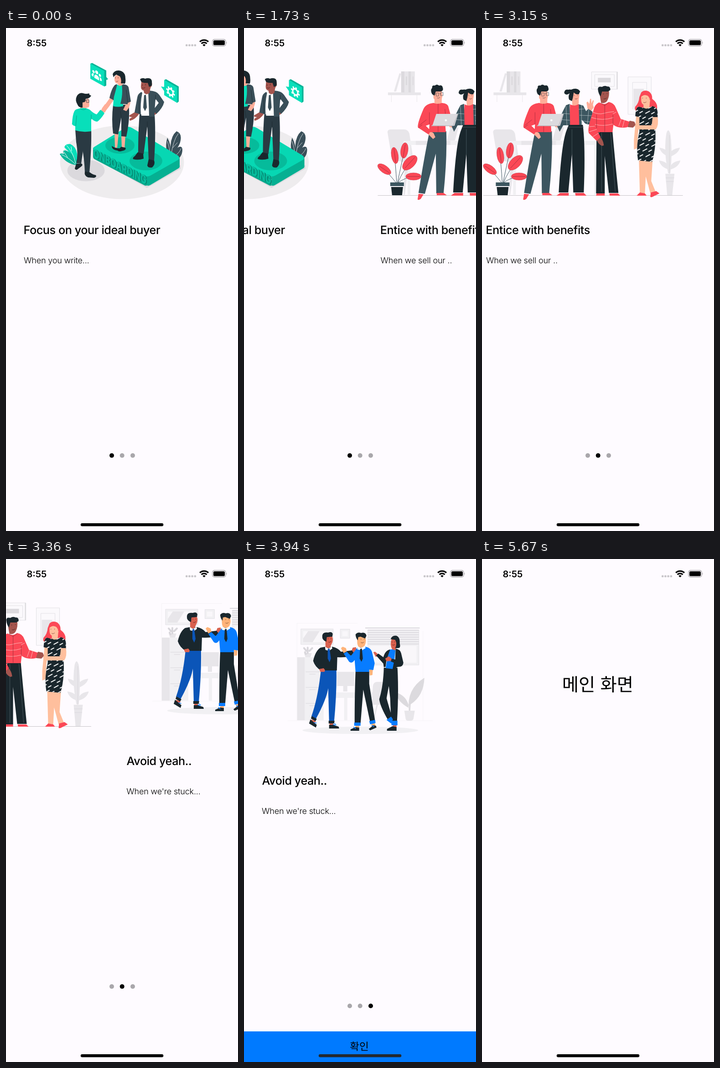
Animation of 509 by 1101 pixels, one loop 6000 ms. Source, as an HTML page:

```html
<!DOCTYPE html>
<html lang="ko">
<head>
<meta charset="utf-8">
<title>Onboarding</title>
<style>
html,body{margin:0;width:100%;height:100%;overflow:hidden;background:#fefbff}
svg{display:block;width:100%;height:100%;font-family:Inter,"Noto Sans CJK KR","Noto Sans CJK",sans-serif;text-rendering:geometricPrecision}
.h{font-size:25.2px;font-weight:500;letter-spacing:-.43px}
.b{font-size:18px;font-weight:300;letter-spacing:-.17px}
.ko{font-family:"Noto Sans CJK KR","Noto Sans CJK",sans-serif;text-anchor:middle}
.ln{fill:none;stroke-linecap:round;stroke-linejoin:round}
.t{fill:#08dfba}.td{fill:#06b598}.n{fill:#3a4f59}.d{fill:#2a3a43}.k{fill:#1a272d}
.s{fill:#ffad98}.br{fill:#a4554e}.w{fill:#fff}
.r{fill:#fb4856}.p{fill:#3c5660}.peach{fill:#ffbf9d}.dash{fill:url(#dash)}
.g1{fill:#f1f0f3}.g2{fill:#e8e6ea}.g3{fill:#dcdade}
.u{fill:#087cff}.ud{fill:#0b55b8}.o{fill:#ffb37a}.m{fill:#d9614f}
</style>
</head>
<body>
<svg viewBox="0 0 509 1101" preserveAspectRatio="none">
<defs>
<pattern id="dash" width="22" height="14" patternUnits="userSpaceOnUse" patternTransform="rotate(-28)">
<path d="M2 3h10M13 10h7" stroke="#fff" stroke-width="1.8" stroke-linecap="round"/>
</pattern>
</defs>
<g id="pages">

<g>
<ellipse cx="254.500" cy="294" rx="136" ry="80.500" fill="#eeecee"/>
<ellipse cx="175.500" cy="312" rx="41" ry="23.500" fill="#dbd9dd"/>
<path class="g3" d="M191 284L309 350 383 308V300L309 335Z"/>
<g class="n">
<path d="M358 288Q347 262 354 240Q361 252 361 266Q360 238 374 226Q386 230 383 246Q382 254 376 262Q386 256 387 266Q387 282 373 290Z"/>
<path class="ln" stroke="#dfe5e8" stroke-width=".9" d="M362 284Q365 248 378 231M354 248Q359 262 361 282M367 282Q379 276 384 264M366 262l10-11"/>
</g>
<g class="t">
<path d="M152 300Q145 276 128 261Q130 253 141 254Q153 259 156 275V300Z"/>
<path class="td" d="M153 300Q130 296 118 276Q120 273 128 276Q122 267 131 268Q146 273 154 290Z"/>
<path class="ln" stroke="#fff" stroke-width="1" d="M133 257Q147 272 153 296M122 277Q138 284 152 298M144 269l-1-9M135 283l-8-12"/>
</g>
<path fill="#05b092" d="M309 322L381 284V303Q381 306 377 308L316 344Q309 347 309 343Z"/>
<path fill="#06a88c" d="M191 262L309 322V345H305L194 287Q191 285 191 282Z"/>
<path fill="#07d7b3" d="M194 260L262 218Q269 214 277 219L377 279Q383 284 377 289L317 323Q309 327 302 323L194 268Q188 264 194 260Z"/>
<g fill="#06bb9b"><ellipse cx="250" cy="257" rx="32" ry="18"/><ellipse cx="307" cy="291" rx="36" ry="20.500"/></g>
<g font-size="26" font-weight="800">
<text transform="matrix(.65 .34 0 1 193.500 283)" fill="#058671">ONBOARDING</text>
<text transform="matrix(.65 .34 0 1 191.500 282)" fill="#07bf9f">ONBOARDING</text>
</g>
<!-- speech bubbles -->
<path class="td" d="M185 78L189 76.500 220 93V126L216 128ZM375 130L379 128V161L375 164Z"/>
<path class="td" d="M215 101L224 112 215 116ZM347 114L351 112 379 128 375 131Z"/>
<path class="t" d="M185 78L215.500 94V128L185 111ZM347 114L375.500 130V164L347 147V138L340 128 347 129Z"/>
<g class="w" transform="matrix(.87 .5 0 1 199 103)">
<circle cy="-6" r="3.800"/><circle cx="-8" cy="-3.500" r="3"/><circle cx="8" cy="-3.500" r="3"/>
<path d="M-6 9Q-7 0 0 0Q7 0 6 9ZM-13 7Q-13 0-7 1Q-9 4-8 8ZM13 7Q13 0 7 1Q9 4 8 8Z"/>
</g>
<g class="ln" stroke="#fff" transform="matrix(.87 .45 0 1 361 140)">
<circle r="6.500" stroke-width="3.600"/><circle r="9.500" stroke-width="3.200" stroke-linecap="butt" stroke-dasharray="3.730"/>
</g>
<!-- woman -->
<path class="s" d="M238 229l9 2-3 31-5 0ZM253 235l9 1-2 28-6-2Z"/>
<path class="k" d="M232 258q8 6 16 5q3 6-5 5q-11-2-11-10ZM253 260l9 2q2 4-3 6l-8 2q-7 0-6-3Z"/>
<path class="d" d="M235 168H269Q273 195 264 238L253 237 253 196 246 233 235 231Q231 200 235 168Z"/>
<path class="t" d="M238 125L256 123 257 171Q246 174 235 171Z"/>
<path class="s" d="M228 153L236 158 226 172 219 181 213 174ZM266 161l7-1q0 12-9 22l-7-3Z"/>
<path class="n" d="M240 124L244 123Q240 140 237 150L236 158 227 153Q232 130 240 124ZM254 123Q267 123 269 130L274 161 267 164V167L251 166Q257 145 254 123Z"/>
<path class="ln" stroke="#1d2b32" stroke-width=".8" d="M264 136l3 27M253 196l-2-14"/>
<path class="s" d="M240 104L254 100 256 124Q251 129 246 125V122Q237 121 238 110Z"/>
<path class="k" d="M234 101Q238 92 248 93Q262 95 262 110Q263 118 261 122L252 121Q254 112 250 106L242 102Q238 104 236 108Z"/>
<path class="ln" stroke="#6c2f2c" stroke-width=".8" d="M240 108v2m6-2v2m-4 7q3 1 4-1"/>
<!-- man in a suit -->
<path class="d" d="M293 189H326Q329 230 325 290H313L310 215 302 276 290 273Q290 225 293 189Z"/>
<path class="k" d="M289 272L301 275 302 286Q290 290 279 287Q277 284 283 280ZM313 287L325 290Q328 298 321 305Q312 307 310 301Z"/>
<path class="w" d="M297 143L314 139 316 192H297Z"/>
<path class="n" d="M303 147l4-1 2 28-4 8-4-8Z"/>
<path class="br" d="M283 184l9 4Q284 200 272 203Q268 199 277 195Q268 195 271 191ZM323 180l8 7q-7 6-14 5l1-6Z"/>
<path class="n" d="M297 140Q289 144 288 152L282 185 292 188 296 192Q294 165 299 142ZM315 137Q331 138 336 146L347 162Q344 175 330 188L322 181 335 164 328 155 326 181V194H314Q313 160 312 140Z"/>
<path class="ln" stroke="#1d2b32" stroke-width=".9" d="M292 150v37M328 147v10M310 205v12"/>
<path class="br" d="M297 117L319 116Q323 124 317 131L315 142Q308 148 303 142L302 137Q296 136 296 128Z"/>
<path class="k" d="M294 112Q300 108 305 111Q318 107 320 116L320 126 314 129 311 120Q303 121 297 118Z"/>
<path class="ln" stroke="#461e1e" stroke-width=".9" d="M299 124v2m7-3v2m-7 6q4 2 6-1"/>
<!-- man in a sweater -->
<path class="d" d="M152 223H170V262Q168 275 165 297L154 296Q159 275 154 250Z"/>
<path class="d" d="M160 223H187Q188 260 183 317L173 316Q172 285 165 250Z"/>
<path class="k" d="M154 297L166 297Q170 300 164 304L156 310Q149 311 152 304ZM173 314L184 316Q190 321 197 322Q200 326 193 328L180 327Q171 324 173 314Z"/>
<path class="s" d="M207 184L211 175 217 167 222 166 224 172 217 185ZM164 160L181 154Q184 168 182 173L176 175 175 180Q168 182 163 177Z"/>
<path class="t" d="M158 177Q172 172 184 179Q192 187 199 189L207 179Q213 182 216 187Q206 202 200 205Q194 205 187 198V226Q168 229 152 224V215Q143 212 145 208Q146 190 150 182Q152 178 158 177Z"/>
<path class="ln" stroke="#069f86" stroke-width="1" d="M155 192l-2 22M187 190v10M163 177q7 4 13 0"/>
<path class="k" d="M168 174Q160 175 157 168Q151 158 155 150Q160 140 170 143Q175 145 183 143Q181 146 187 148Q183 155 175 155L173 162 168 163Z"/>
<path class="ln" stroke="#263238" stroke-width=".8" d="M171 160l5-1m0-2h6v6h-5Z"/>
<text class="h" x="38.400" y="451">Focus on your ideal buyer</text>
<text class="b" x="39" y="514.500">When you write...</text>
</g>

<g transform="translate(497.300)">
<!-- room -->
<path class="g2" d="M67 141h72v6H67ZM74 147h1v15h-1ZM130 147h1v15h-1ZM80 139L92 99l4 1-11 39ZM96 95h30v46H96Z"/>
<path class="g3" d="M96 95h7v46h-7ZM112 95h5v46h-5ZM106 106h3v19h-3ZM121 106h2v19h-2Z"/>
<path fill="#fbf9fc" stroke="#e2e0e5" d="M282 96h57v38h-57ZM289 102h43v26h-43ZM362 107h51v82h-51ZM372 119h31v58h-31Z"/>
<path class="g3" d="M296 109h28v10h-28ZM337 96h2v38h-2Z"/>
<path class="g2" d="M374 133h23v42h-23Z"/>
<path class="g2" d="M66 228Q66 222 73 222H102Q111 222 114 231L122 284 113 294 104 365H101L104 294 76 288Z"/>
<path class="g1" d="M101 247h190v9H101ZM110 256h6v109h-6ZM288 250h4v115h-4ZM194 250l22-33h5l-10 39Z"/>
<path class="g2" d="M128 247h76v9h-76ZM204 218h18l-8 28h-18ZM444 319h20l-5 47h-11Z"/>
<g class="g2">
<path d="M450 318Q440 270 446 232Q450 216 455 232Q460 270 455 318Z"/>
<path d="M452 282Q434 275 431 262Q447 264 452 276ZM453 282Q472 276 476 262Q458 264 453 276ZM452 310Q434 305 430 290Q448 292 452 305ZM454 310Q473 305 477 290Q459 292 454 305Z"/>
</g>
<path class="ln" stroke="#c7c5c9" stroke-width="1" d="M45 366.500H482"/>
<path class="ln" stroke="#d6d4d8" stroke-width=".8" d="M453 235v84M445 328h18M446 336h16"/>
<!-- potted plant -->
<path class="ln" stroke="#3c5660" stroke-width="1" d="M84 338Q70 319 54 306M86 338Q84 300 80 270M88 338Q96 300 103 268M89 338Q100 312 118 291M90 338Q103 328 126 324"/>
<g class="r" stroke="#b73040" stroke-width=".5">
<ellipse cx="59" cy="309" rx="17" ry="8" transform="rotate(36 59 309)"/>
<ellipse cx="82" cy="279" rx="7.500" ry="18" transform="rotate(-9 82 279)"/>
<ellipse cx="103" cy="268" rx="8" ry="17" transform="rotate(8 103 268)"/>
<ellipse cx="115" cy="295" rx="20" ry="11" transform="rotate(-45 115 295)"/>
<ellipse cx="123" cy="325" rx="17" ry="8"/>
</g>
<path class="ln" stroke="#6e2833" stroke-width=".6" d="M48 302L70 317M80 264L84 294M105 255L100 284M126 283L104 307M109 325H137"/>
<path class="p" d="M72 338h30v8H72Z"/><path class="k" d="M74 348h26l-2 18H76Z"/>
<!-- man with a laptop -->
<path class="p" d="M158 227L195 226Q197 285 189 362H173L172 275 148 363 134 361Q146 285 158 227Z"/>
<path class="r" d="M134 363l11 1-6 10q-6 4-7 1ZM174 361h15l7 5h-22Z"/>
<path class="s" d="M169 150L185 147V163L182 168H169ZM157 224l10 6 4 9-5 4-12-12Z"/>
<path class="r" d="M167 164Q176 168 185 164Q199 165 200 174L207 200 193 215 194 228H157L158 211 150 214 161 225 156 233 133 218Q130 212 145 177Q150 166 167 164Z"/>
<path class="ln" stroke="#a52a3b" stroke-width=".8" d="M158 185v25M136 213l15-12M177 166v62M192 178l2 20M134 218l8-6"/>
<path class="s" d="M166 136H184Q188 147 185 155Q183 162 174 161L167 154Z"/>
<path class="k" d="M164 145Q159 136 164 131Q163 125 170 126Q174 122 179 126Q186 124 187 130Q190 137 183 139H172L169 148Z"/>
<path class="ln" stroke="#364248" stroke-width=".7" d="M169 145h4m0-3h5v7h-5Zm7 2h3m0-3h5v7h-5ZM175 153q3 2 6-1"/>
<!-- woman with a bun -->
<path class="s" d="M239 152L254 148V164L251 171H240ZM273 176L271 163l3-2 3 5 2-11 2 0 1 10 3-7 2 1-2 9 2 6-7 9ZM214 206l-13 4 1 7 13 2Z"/>
<path class="r" d="M235 167Q245 173 254 166L259 213H232Z"/>
<path class="p" d="M234 166L235 213H220L212 227 205 211Q222 176 226 169ZM254 167L264 170 270 182 275 177 284 183V208Q279 214 268 209L261 201V213H255Z"/>
<path class="ln" stroke="#d7e2e4" stroke-width=".6" d="M226 171l2 42M217 187l17 1M210 200l24 2M260 169v43M254 178l12-1M256 191l28 1M259 203l24 3M276 178l-3 32"/>
<path class="k" d="M232 212H263Q269 260 265 360H242L239 275 231 360H210Q216 250 228 222Z"/>
<path class="ln" stroke="#64747b" stroke-width=".6" d="M229 217h36M239 222v54"/>
<path class="r" d="M213 361h19v6h-27ZM246 361h19l6 6h-24Z"/>
<path class="s" d="M238 141L254 139Q257 148 253 158Q249 163 242 160L237 153Z"/>
<path class="k" d="M234 143Q226 149 222 142Q223 133 231 135Q235 134 237 135Q251 129 257 139L254 145Q247 146 243 141L241 153 239 160 233 157Q230 150 234 143Z"/>
<path class="ln" stroke="#713c36" stroke-width=".8" d="M244 147v1m7-1v1m-5 7q3 2 5-1"/>
<!-- laptop -->
<path class="g3" d="M173 188h48l-8 26h-50l2-2Z"/><path class="ln" stroke="#bdbbc0" stroke-width="1.500" d="M163 214h47l10-25"/>
<circle class="w" cx="194" cy="202" r="2.300"/>
<!-- man in a striped shirt -->
<path class="k" d="M293 227H328Q334 295 341 361H320L311 280V362H292Z"/>
<path class="ln" stroke="#64747b" stroke-width=".6" d="M304 230v128M324 230l10 128"/>
<path class="r" d="M293 362h18v5h-19ZM321 362h19l5 5h-23Z"/>
<path class="br" d="M293 244l8-5q7 7 8 18l-4 1q-8-3-12-14ZM359 211l7-8 10 2 3 7-6 6-11-1Z"/>
<path class="r" d="M299 163Q309 170 320 162Q331 164 335 174L346 199 365 205 361 217Q342 221 330 212L328 228H292L291 218 302 239 293 247 276 230Q272 220 286 181Q289 166 299 163Z"/>
<path class="ln" stroke="#ffc2c0" stroke-width=".9" d="M284 184q14 6 24 3t23-4M282 196q24 8 48 0M290 211q18 5 39-1M336 184l-7 4M347 200l-5 14M354 202l-4 15M277 216l12-1M277 227l16-5M285 238l14-9"/>
<path class="ln" stroke="#932d38" stroke-width=".8" d="M311 168v59M293 190v29M329 190v20M302 164l9 6 9-7"/>
<path class="br" d="M299 136H320Q322 148 317 158Q313 166 303 164L301 153Z"/>
<path class="k" d="M296 134Q296 127 305 129Q311 125 316 128Q324 127 323 136L318 139H305L302 150Q297 144 296 134Z"/>
<path class="ln" stroke="#3f2522" stroke-width=".9" d="M308 144v1m8-2v1m-7 11q4 1 6-2"/>
<!-- woman in a dress -->
<path class="r" d="M391 141Q398 134 408 139Q416 145 415 155Q427 164 426 174Q426 184 411 184L386 184Q374 181 378 172Q386 164 387 151Z"/>
<path class="peach" d="M386 289H416L413 335 424 362H411L401 325 399 363H388Z"/>
<path class="peach" d="M380 192L390 190 384 230 382 263 375 266 375 245Z"/>
<g id="dress">
<path class="k" d="M385 172Q402 178 416 171Q427 174 427 184V197L416 195 416 219 422 224Q424 263 415 293L384 290Q379 259 387 227V195L378 193Q379 174 385 172Z"/>
<path class="dash" d="M385 172Q402 178 416 171Q427 174 427 184V197L416 195 416 219 422 224Q424 263 415 293L384 290Q379 259 387 227V195L378 193Q379 174 385 172Z"/>
</g>
<path class="peach" d="M391 147L408 143Q413 152 410 162L409 174Q402 179 396 174V168Q390 165 391 154ZM416 195L427 195Q430 213 423 222L378 222 377 213 414 213Z"/>
<path class="r" d="M389 148Q391 139 402 139Q412 142 415 154L410 158Q409 148 401 147Q396 146 389 152ZM388 360l11 2 4 5h-22ZM412 360l12-3 7 5-16 8q-5 1-4-2Z"/>
<path class="ln" stroke="#773a32" stroke-width=".8" d="M394 153v1m8-1v1m-6 9q3 2 6-1"/>
<text class="h" x="50" y="451">Entice with benefits</text>
<text class="b" x="50.700" y="514.500">When we sell our ..</text>
</g>

<g transform="translate(1008.700)">
<!-- office -->
<path fill="none" stroke="#f5f3f6" d="M125.500 310V97.500H258M402 115V310M105 311H423"/>
<path class="g1" stroke="#e4e2e7" d="M134 110h71v34h-71ZM220.500 110.500h21v20h-21ZM281 112h112v77H281Z"/>
<path fill="#f9f7fa" d="M139 115h61v24h-61ZM225 115h12v11h-12ZM286 147h48v37h-48ZM340 147h48v37h-48Z"/>
<path class="g2" d="M150 115h25l-15 24h-21v-8ZM126 172h17v138h-17Z"/>
<path class="ln" stroke="#d9d7dc" stroke-width="2" d="M276 108H394"/>
<path class="ln" stroke="#dedce1" stroke-width="2.200" d="M281 113H392M281 118H392M281 123H392M281 128H392M281 133H392M281 138H392M281 143H392"/>
<path class="g1" d="M143 172h41v138h-41ZM168 249h124v12H168ZM229 261h7v49h-7Z"/>
<path class="ln" stroke="#d9d7dc" d="M145 204h37M145 238h37M145 273h37M153 209h13M153 243h13M153 278h13"/>
<path class="g2" d="M213 204h38v31h-38ZM227 235h9v12h-9ZM292 236Q293 226 301 226H319L325 276H290ZM300 276h3l-8 34h-2ZM320 276h3l4 34h-2ZM141 163h17l-3 9h-11Z"/>
<path class="ln" stroke="#d9d7dc" stroke-width="4" d="M149 163v-12M146 158l-5-6M153 158l6-6M145 165l-2-4"/>
<path class="g3" d="M371 290Q365 242 405 217Q404 256 375 275L374 290ZM371 279Q365 255 342 249Q346 270 371 283Z"/>
<path class="g2" d="M361 289h23l-3 18q-2 4-5 4h-7q-4 0-5-4Z"/>
<ellipse class="g1" cx="264.500" cy="332" rx="127" ry="8"/>
<!-- left man -->
<path class="m" d="M158 308l9 4-5 8-7-4ZM197 315h8v7h-8ZM245 158l3-7 7-1 1 6-7 8Z"/>
<path class="ud" d="M178 200H212Q213 250 207 313H196L194 240Q190 265 167 307L157 302Q172 260 178 200Z"/>
<path class="k" d="M158 301l11 6-3 5-10-6ZM195 311h13l-1 6h-12ZM155 308l14 12-2 6-15-9ZM196 320l9 0 12 4 1 4h-22Z"/>
<path class="ln" stroke="#0f7fff" stroke-width="1.600" d="M163 315l5 1M205 319l4 2M208 317l3 3"/>
<path class="k" d="M177 151L188 149 203 149Q216 152 222 160L246 157 251 164Q240 174 214 172L213 201H177L175 190 172 182 184 197 178 201Q165 193 161 180Q166 158 177 151Z"/>
<path class="m" d="M174 198l10-2 3 4-1 4h-9ZM187 126L202 125Q207 134 201 144L197 153 188 150V140Z"/>
<path class="w" d="M187 149l8 4 7-5 1 5-7 5-8-2Z"/><path class="ud" d="M193 154l4-1 3 22-3 8-4-8Z"/>
<path class="k" d="M181 125Q182 116 194 118Q202 115 204 121L203 127 191 128 190 138Q180 135 181 125Z"/>
<path class="ln" stroke="#5c241d" stroke-width=".9" d="M194 131v1m6-1v1m-5 7q4 1 5-2"/>
<!-- middle man -->
<path class="o" d="M254 321h8v7h-8ZM288 317l8-2 2 8-8 2ZM222 152l4-3 7 3 2 7-7 4ZM284 199l8 0-1 12-6 1Z"/>
<path class="k" d="M254 203H284V230L297 312 286 314 271 243 265 317H252Q252 250 254 203Z"/>
<path class="u" d="M251 315h14v7h-14ZM284 312l13-3 1 7-12 3ZM258 151L276 149Q288 152 290 160L296 185 293 200 284 199V204H254L252 178Q246 187 240 182L228 164 235 160 244 169Z"/>
<path class="k" d="M243 330l11-5 8 1v7h-19ZM283 329l10-8 6 1 1 4-14 6Z"/>
<path class="ln" stroke="#0f7fff" stroke-width="1.600" d="M250 325l4 3M290 321l4 3"/>
<path class="o" d="M257 127L275 126Q279 137 274 147L268 152 260 149 258 143Z"/>
<path class="w" d="M258 148l8 4 9-5 1 5-8 5-10-2Z"/><path class="k" d="M264 154l4-1 2 22-3 7-4-7Z"/>
<path class="k" d="M254 122Q259 116 266 119Q276 116 278 125L275 131 265 127 260 128 259 135Q254 129 254 122Z"/>
<path class="ln" stroke="#6e4224" stroke-width=".9" d="M266 132v1m7-1v1m-7 7q4 2 6-1"/>
<!-- right woman -->
<path class="k" d="M316 195H346Q349 250 345 313H332L330 262 327 235 322 262 334 303 325 309Q308 280 306 264Q315 235 316 195Z"/>
<path class="u" d="M322 309l10-7 4 6-4 9-8-6ZM332 311h14v10h-13ZM327 156L342 153 337 198 320 196Z"/>
<path class="m" d="M336 321h8v5h-8ZM293 161l4-1 5 4 1 6-5 1Z"/>
<path class="k" d="M335 323l9 2v8h-21v-4ZM299 168L304 164 315 172Q319 157 330 155L322 178 320 193 316 194 315 186ZM342 153Q352 155 354 163L359 184Q358 194 347 193L335 199 338 184 331 181 333 175 341 177Z"/>
<path class="m" d="M319 175l8-5 6 5-1 5-10 1ZM333 132L345 130 346 148 340 157 334 154Q329 145 333 132Z"/>
<path class="k" d="M331 132Q335 123 344 125Q352 128 351 142Q354 152 347 152H341Q346 143 341 134L334 133Z"/>
<path class="ln" stroke="#5c241d" stroke-width=".9" d="M334 138v1m6-1v1m-5 6q3 2 5-1"/>
<text class="h" x="48.700" y="451">Avoid yeah..</text>
<text class="b" x="48.300" y="514.500">When we're stuck...</text>
</g>
</g>

<g id="dots"><circle cx="232" cy="935.700" r="5"/><circle cx="254.700" cy="935.700" r="5"/><circle cx="278" cy="935.700" r="5"/></g>
<g id="button"><path fill="#007aff" d="M0 0h509v67H0Z"/><text class="ko" x="253" y="41" font-size="22.500">확인</text></g>
<g id="main"><path fill="#fefbff" d="M0 0h509v1101H0Z"/><text class="ko" x="254" y="289" font-size="39.500">메인 화면</text></g>

<text x="45.500" y="40" font-size="20" font-weight="600">8:55</text>
<g fill="#c9c7cb"><rect x="394" y="35.500" width="4.500" height="4.500" rx="1.500"/><rect x="400.200" y="35.500" width="4.500" height="4.500" rx="1.500"/><rect x="406.400" y="35.500" width="4.500" height="4.500" rx="1.500"/><rect x="412.600" y="35.500" width="4.500" height="4.500" rx="1.500"/></g>
<path fill="none" stroke="#000" stroke-width="3.300" d="M425.200 30.200a13.300 13.300 0 0 1 18.800 0M428.700 34.100a8.400 8.400 0 0 1 11.800 0"/>
<path d="M431.400 36.900L434.600 40.200 437.800 36.900A4.600 4.600 0 0 0 431.400 36.900Z"/>
<rect x="453" y="25" width="29" height="14.500" rx="4.300" fill="none" stroke="#a3a1a5" stroke-width="1.300"/>
<rect x="455" y="27" width="25" height="10.500" rx="2.600"/><path fill="#a3a1a5" d="M483.500 30q2 2.200 0 4.600Z"/>
<rect id="bar" x="163.800" y="1084" width="181.500" height="6.500" rx="3.200"/>
</svg>
<script>
const LOOP = 6000, WIDTH = 509, STEP = 30;
const $ = id => document.getElementById(id);
const move = (id, x, y) => $(id).setAttribute('transform', `translate(${x} ${y})`);
const since = (t, start) => Math.max(0, Math.floor((t - start) / STEP) * STEP / 1000);
const easeOut = (u, power) => 1 - (1 - Math.min(1, u)) ** power;

// Finger drag, then a critically damped spring to the next page.
function swipe(t, start, jump, release) {
  if (t < start) return 0;
  const s = since(t, start), drag = x => jump + 300 * x + 2800 * x * x;
  if (s < release) return drag(s);
  const w = 20, gap = WIDTH - drag(release), v = 300 + 5600 * release, r = s - release;
  return WIDTH - (gap + (w * gap - v) * r) * Math.exp(-w * r);
}

function draw(t) {
  const scroll = swipe(t, 1520, 17, .165) + swipe(t, 3150, 30, .15);
  const shown = t < 3760 ? 0 : easeOut(since(t, 3730) / .21, 2);
  const modal = easeOut(since(t, 5300) / .36, 3);
  const page = t < 2150 ? 0 : t < 3730 ? 1 : 2;
  move('pages', -scroll, 43 * shown);
  move('dots', 0, 42.500 * shown);
  move('button', 0, 1101 - 67 * shown);
  move('main', 0, 1101 * (1 - modal));
  [...$('dots').children].forEach((dot, i) => dot.setAttribute('fill', i === page ? '#000' : '#a9a7ab'));
  $('bar').setAttribute('fill', shown > .5 && modal < .1 ? '#24282e' : '#000');
}

const begin = performance.now();
(function tick() {
  draw((performance.now() - begin) % LOOP);
  requestAnimationFrame(tick);
})();
</script>
</body>
</html>
```
